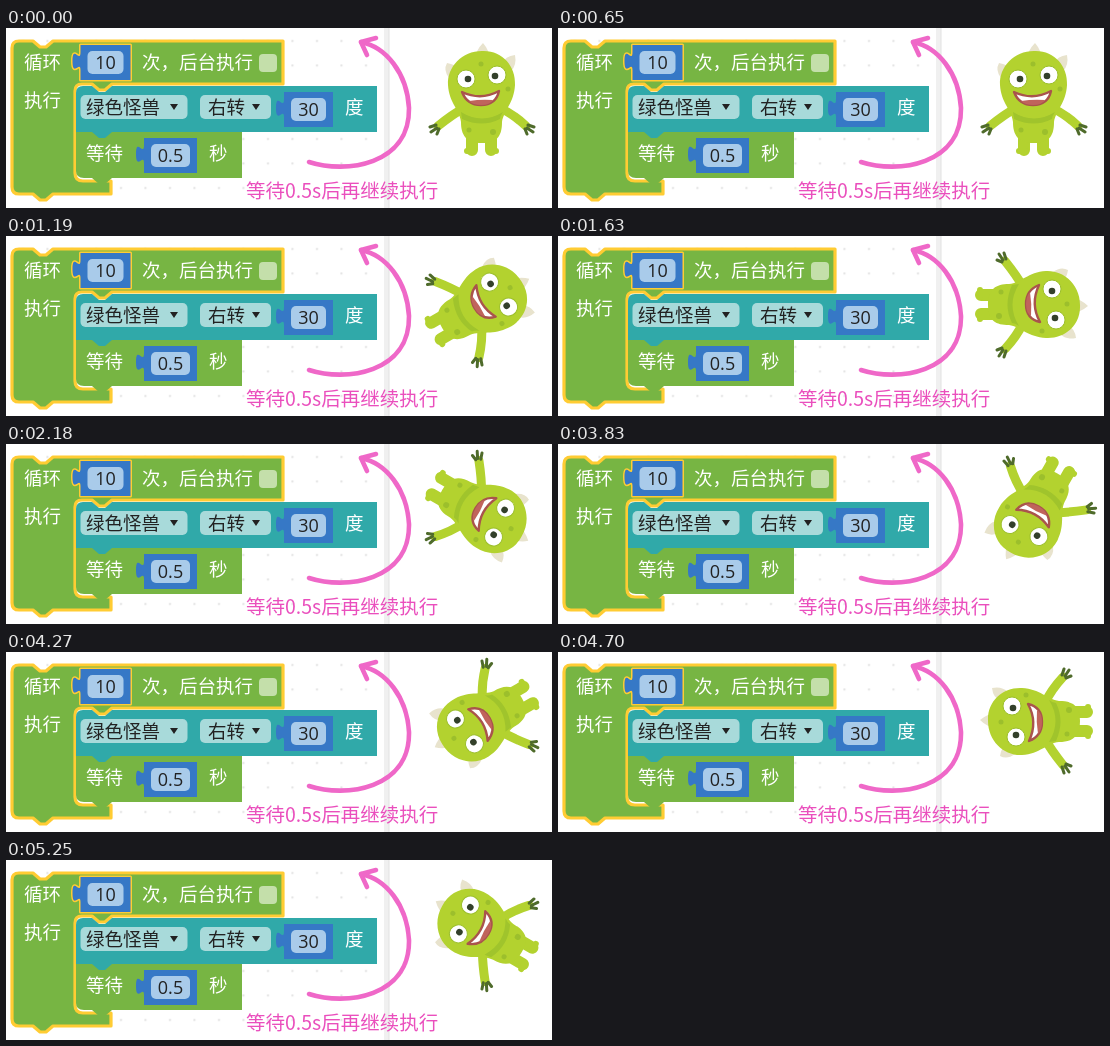
These frames come from a looping animation (546x180 px, 6440 ms). An HTML page:

```html
<!DOCTYPE html>
<html lang="zh">
<head>
<meta charset="utf-8">
<style>
html, body { margin: 0; width: 100%; height: 100%; overflow: hidden; background: #fff; }
svg { display: block; }
text { font: 18.5px "Noto Sans CJK SC", "Noto Sans CJK", "Noto Sans", sans-serif; fill: #fff; }
.value text { fill: #222; text-anchor: middle; font-size: 18px; font-family: "Open Sans", "Noto Sans", sans-serif; }
.line { fill: none; stroke-linecap: round; stroke-linejoin: round; }
</style>
</head>
<body>
<svg width="546" height="180" viewBox="0 0 546 180">
  <defs>
    <pattern id="grid" x="5" y="1" width="24.5" height="24.5" patternUnits="userSpaceOnUse">
      <path d="M11 12h2" stroke="#e2e2e2" stroke-width="2"/>
    </pattern>
  </defs>
  <rect width="377" height="180" fill="url(#grid)"/>
  <rect x="378" width="5" height="180" fill="#f0f0f0"/>
  <path d="M383 0V180" stroke="#e2e2e2"/>

  <!-- loop block -->
  <path d="M6 20Q6 13 13 13H27L34 19H40L47 13H277V56H106L99 62H93L86 56H76Q69 56 69 63V145Q69 153 77 153H105V166H47L40 172H34L27 166H13Q6 166 6 159Z"
    fill="#77b543" stroke="#fc3" stroke-width="3.2" stroke-linejoin="round"/>
  <rect x="253" y="26" width="18" height="18" rx="4" fill="#c4dfaa"/>
  <!-- inner blocks -->
  <path d="M70 104H236V150H106L99 156H93L86 150H78Q70 150 70 143Z" fill="#77b543"/>
  <path d="M70 65Q70 58 77 58H86L93 64H99L106 58H371V104H106L99 110H93L86 104H70Z" fill="#30a9a9"/>
  <g fill="#a8dada">
    <rect x="74.5" y="67" width="107" height="24" rx="5"/>
    <rect x="194" y="67" width="71" height="24" rx="5"/>
  </g>
  <path d="M164 76h8l-4 6zM246 76h8l-4 6z" fill="#222"/>
  <g id="values"></g>

  <text x="18" y="41">循环</text>
  <text x="136" y="41">次，后台执行</text>
  <text x="18" y="79">执行</text>
  <text x="80" y="86" style="fill:#222">绿色怪兽</text>
  <text x="202" y="86" style="fill:#222">右转</text>
  <text x="339" y="86">度</text>
  <text x="80" y="132">等待</text>
  <text x="203" y="132">秒</text>

  <g class="line" stroke="#ef68c8" stroke-width="4.6">
    <path d="M303 134C340 146 404 137 403 80C401 45 380 19 355 14"/>
    <path d="M370 10L355 14L361 27"/>
  </g>
  <text x="240" y="169.5" style="fill:#ea4fbd;font-size:19.5px">等待0.5s后再继续执行</text>

  <g id="monster">
    <path d="M443 50Q437 42 441 35Q449 36 457 43ZM496 36Q499 28 509 27Q511 37 505 43ZM469 31Q470 22 477 15Q483 22 484 31Z" fill="#e8e3cd"/>
    <g class="line" stroke="#b3d22f">
      <path d="M458 80Q447 86 432 98M494 80Q507 86 520 98" stroke-width="9"/>
      <path d="M466 108V122M485 108V122" stroke-width="12"/>
      <path d="M461 123H468M483 123H490" stroke-width="6"/>
    </g>
    <path d="M430 97L424 99M431 100L425 104M433 101L431 106M522 97L528 99M521 100L527 104M519 101L521 106"
      class="line" stroke="#4f6b2b" stroke-width="3"/>
    <path d="M476 23C496 22 510 38 509 57C508 75 498 82 496 94C496 107 492 115 476 115C460 115 455 107 455 94C454 82 443 75 442 57C441 39 456 23 476 23Z" fill="#b3d22f"/>
    <path d="M455 84Q476 97 497 84Q494 88 494 91Q476 100 456 91Z" fill="#a0c42c"/>
    <g fill="#9cbf2c">
      <circle cx="463" cy="102" r="2.5"/><circle cx="487" cy="104" r="3"/>
      <circle cx="502" cy="61" r="2.5"/><circle cx="475" cy="36" r="2.5"/>
    </g>
    <g fill="#fff" stroke="#9cbf2c">
      <circle cx="460" cy="51" r="9"/><circle cx="491" cy="47" r="9"/>
    </g>
    <g fill="#33402a">
      <circle cx="462" cy="51" r="3.3"/><circle cx="489" cy="48" r="3.3"/>
    </g>
    <path d="M456 64Q475 73 493 63Q490 77 475 77Q461 77 456 64Z" fill="#fff" stroke="#a9544c" stroke-width="2.4" stroke-linejoin="round"/>
    <path d="M463 73Q475 71 487 72Q484 77 475 77Q467 77 463 73Z" fill="#c0645c"/>
  </g>
</svg>
<script>
const $ = id => document.getElementById(id);

// Box with a jigsaw tab on its left
const socket = (x, y, w, h) => `M${x} ${y}h${w}v${h}h${-w}v${25 - h}c0-10-8 8-8-9s8 3 8-9z`;

const value = (x, y, w, h, label) => `<g class="value">
  <path d="${socket(x, y, w, h)}" fill="#3678c6"/>
  <rect x="${x + 7}" y="${y + 6}" width="${w - 14}" height="${h - 12}" rx="5" fill="#a9cbea"/>
  <text x="${x + w / 2}" y="${y + h / 2 + 6.5}">${label}</text></g>`;

$('values').innerHTML =
  `<path d="${socket(74.5, 17, 50, 35)}" class="line" stroke="#fc3" stroke-width="3"/>` +
  value(74.5, 17, 50, 35, '10') + value(278, 64, 49, 35, '30') + value(138, 110, 53, 35, '0.5');

const LOOP = 6440;
const turns = [860, 1190, 1630, 2180, 2730, 3160, 3710, 4270, 4700, 5250];

function draw() {
  const t = performance.now() % LOOP;
  const angle = 30 * turns.filter(start => start <= t).length;
  $('monster').setAttribute('transform', `rotate(${angle} 476 69)`);
  requestAnimationFrame(draw);
}
draw();
</script>
</body>
</html>
```
